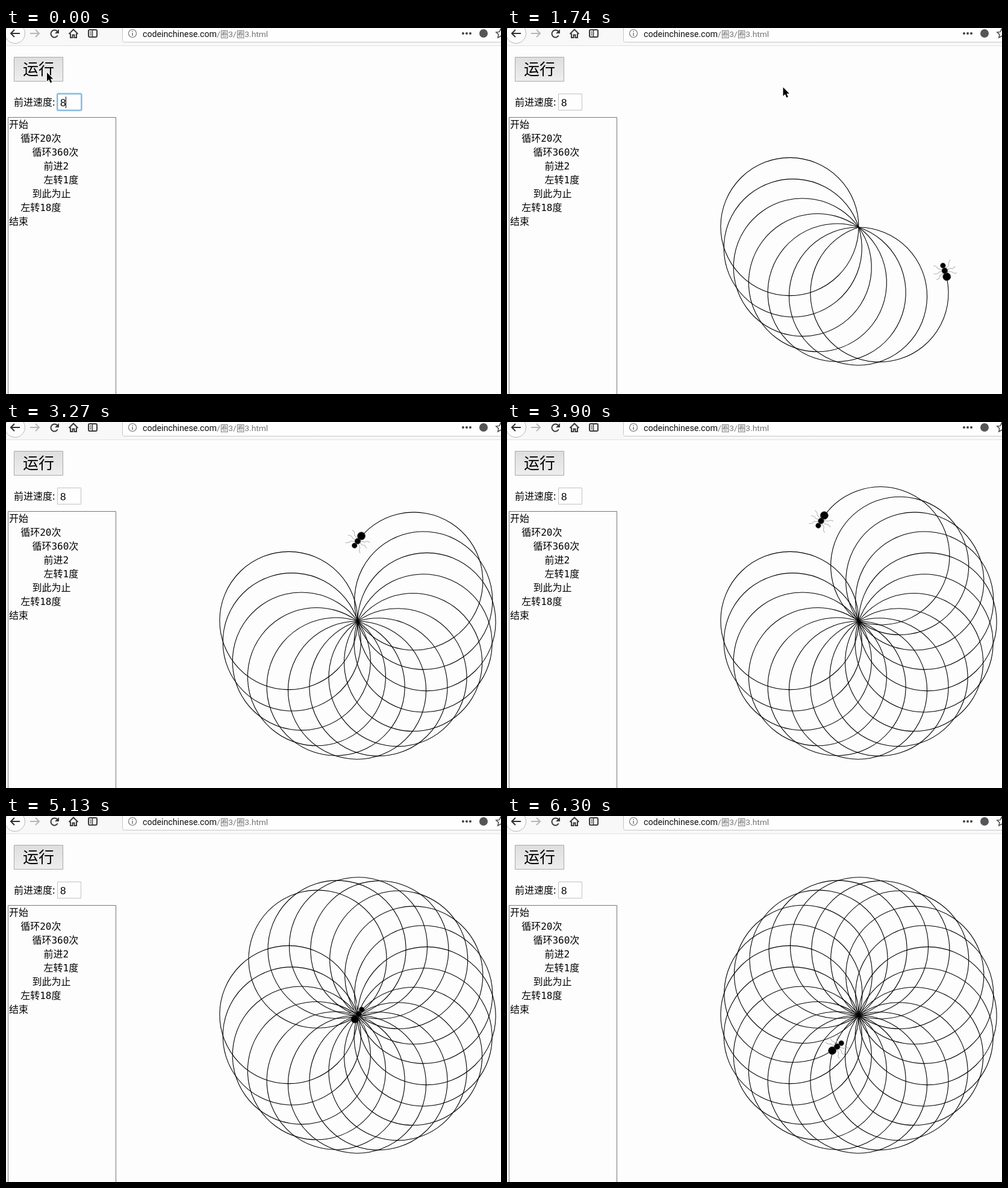
Recreate the animation shown at these times as an HTML page with a canvas. Size 822 px wide and 608 px high, loop 6.33 s.

```html
<!DOCTYPE html>
<html lang="zh">
<head>
<meta charset="utf-8">
<style>
html, body { margin: 0; width: 100%; height: 100%; overflow: hidden; background: #fdfdfd; }
canvas { display: block; }
</style>
</head>
<body>
<canvas id="stage" width="822" height="608"></canvas>
<script>
const g = document.getElementById('stage').getContext('2d');
const LOOP = 6330, STEP = 30, TAU = Math.PI * 2, RAD = Math.PI / 180;
const HOME = { x: 584, y: 331 }, R = 1 / Math.sin(0.5 * RAD);
const CLICK = 690;
const SANS = '"Noto Sans CJK SC", "Noto Sans CJK", sans-serif';
const MONO = '"DejaVu Sans Mono", "Noto Sans CJK SC", "Noto Sans CJK", monospace';

// [time, degrees walked]; [time, x, y] of the pointer tip
const WALK = [[740, 0], [1200, 1344], [2280, 3296], [3270, 4609], [4590, 5984], [5700, 6976], [6300, 7168]];
const POINTER = [[0, 68, 74], [750, 68, 74], [1200, 213, 122], [2280, 704, 75], [2550, 826, 66]];
const PROGRAM = [[0, '开始'], [1, '循环20次'], [2, '循环360次'], [3, '前进2'], [3, '左转1度'],
  [2, '到此为止'], [1, '左转18度'], [0, '结束']];

function along(keys, t, col, map = v => v) {
  let i = 1;
  while (i < keys.length - 1 && t > keys[i][0]) i++;
  const a = keys[i - 1], b = keys[i];
  const u = Math.min(1, Math.max(0, (t - a[0]) / (b[0] - a[0])));
  return map(a[col]) + (map(b[col]) - map(a[col])) * u;
}

// Walking slows down as the trail gets longer.
const LAG = 1900;
function walked(t) {
  const effort = along(WALK, t, 1, d => d * d / 2 + LAG * d);
  return Math.sqrt(LAG * LAG + 2 * effort) - LAG;
}

function path(points, close) {
  g.beginPath();
  points.forEach(([x, y]) => g.lineTo(x, y));
  if (close) g.closePath();
}
function line(points, color, width = 1) {
  path(points);
  g.strokeStyle = color;
  g.lineWidth = width;
  g.stroke();
}
function disc(x, y, r, fill, stroke, width = 1) {
  g.beginPath();
  g.arc(x, y, r, 0, TAU);
  if (fill) { g.fillStyle = fill; g.fill(); }
  if (stroke) { g.strokeStyle = stroke; g.lineWidth = width; g.stroke(); }
}
function box(x, y, w, h, r, fill, stroke, width = 1) {
  g.beginPath();
  g.roundRect(x, y, w, h, r);
  if (fill) { g.fillStyle = fill; g.fill(); }
  g.strokeStyle = stroke;
  g.lineWidth = width;
  g.stroke();
}
function text(s, x, y, font, color = '#000') {
  g.font = font;
  g.fillStyle = color;
  g.fillText(s, x, y);
}

function arrow(x, dir, color) {
  line([[x - 8 * dir, 9], [x + 7 * dir, 9]], color, 2);
  line([[x + 1 * dir, 3], [x + 7 * dir, 9], [x + 1 * dir, 15]], color, 2);
}

function toolbar() {
  const ink = '#3a3a3c';
  g.fillStyle = '#f8f8f9';
  g.fillRect(0, 0, 822, 29);
  line([[0, 29.5], [822, 29.5]], '#e2e2e3');
  disc(15, 9, 16.5, '#fdfdfd', '#b6b6b8');
  arrow(15, -1, '#303032');
  arrow(48, 1, '#b6b6b8');

  g.beginPath();
  g.arc(80.5, 9.5, 6, 0.5, TAU - 0.75);
  g.strokeStyle = ink;
  g.lineWidth = 2;
  g.stroke();
  g.fillStyle = ink;
  path([[88, 2], [88, 9], [81, 9]], true);
  g.fill();

  line([[104.5, 10], [112, 2.5], [119.5, 10]], ink, 2);
  line([[107, 9], [107, 16], [110.5, 16], [110.5, 11.5], [113.5, 11.5], [113.5, 16], [117, 16], [117, 9]], ink, 2);
  box(137, 3, 14, 12, 2, null, ink, 2);
  line([[143.5, 3], [143.5, 15]], ink, 1.5);
  [6.5, 9, 11.5].forEach(y => line([[139, y], [142, y]], ink));

  box(193.5, -8, 660, 31.5, 3, '#fefefe', '#c6c6c8');
  disc(210, 9, 6.5, null, '#737376', 1.2);
  line([[210, 8], [210, 13]], '#737376', 1.5);
  line([[210, 5], [210, 6.5]], '#737376', 1.5);
  const family = 'px Roboto, "Noto Sans CJK SC", "Noto Sans CJK", sans-serif';
  text('codeinchinese.com', 227, 15, 14.2 + family, '#101012');
  text('/圈3/圈3.html', 350, 15, 13.7 + family, '#737376');

  [759, 765, 771].forEach(x => disc(x, 9, 2, '#424244'));
  disc(793, 9, 7, '#555558');
  const star = [];
  for (let i = 0; i < 10; i++) {
    const r = i % 2 ? 3.8 : 8, a = (i * 36 - 90) * RAD;
    star.push([821.5 + r * Math.cos(a), 9.5 + r * Math.sin(a)]);
  }
  path(star, true);
  g.strokeStyle = '#48484a';
  g.lineWidth = 1.5;
  g.stroke();
}

function form(focused) {
  const shade = g.createLinearGradient(0, 48, 0, 89);
  shade.addColorStop(0, '#dededf');
  shade.addColorStop(1, '#eeeeef');
  box(13.5, 48.5, 81, 40, 0, shade, '#a8a8aa');
  text('运行', 28, 77.5, '26px ' + SANS);
  text('前进速度:', 13, 129, '16px ' + SANS);
  if (focused) {
    box(85, 109, 40.5, 28, 2, '#fefefe', '#b2d5ee', 3);
    box(85.5, 109.5, 39.5, 27, 1, null, '#62a6d6');
    line([[99.5, 114], [99.5, 133]], '#000');
  } else {
    box(85.5, 109.5, 39, 27, 0, '#fefefe', '#c2c2c4');
  }
  text('8', 90, 129.5, '17px "Liberation Sans", Arial, sans-serif');

  box(3.5, 148.5, 179, 480, 0, null, '#777779');
  PROGRAM.forEach(([depth, s], i) => text(s, 5 + depth * 19.2, 166 + i * 23, '16px ' + MONO));
}

function ant(x, y, heading) {
  g.save();
  g.translate(x, y);
  g.rotate(-heading);
  [-1, 1].forEach(s => {
    line([[3, 3 * s], [6, 9 * s], [11, 11 * s], [14, 15 * s]], '#b0b0b6');
    line([[0, 3 * s], [1, 10 * s], [-1, 13 * s], [1, 19 * s]], '#b0b0b6');
    line([[-3, 3 * s], [-5, 10 * s], [-9, 13 * s], [-10, 18 * s]], '#b0b0b6');
  });
  disc(-10.5, 0, 6.5, '#000', '#444446', 0.8);
  disc(0, 0, 4.8, '#000', '#444446', 0.6);
  disc(9, 0, 4.3, '#000', '#444446', 0.6);
  g.restore();
}

function drawing(degrees) {
  const last = Math.floor(degrees / 360);
  g.strokeStyle = '#000';
  g.lineWidth = 1.1;
  for (let k = 0; k <= last; k++) {
    // Each ring is a 360-gon, so its tangent lags half a turn step behind the heading.
    const from = (18 * k - 0.5) * RAD;
    const sweep = Math.min(360, degrees - 360 * k) * RAD;
    const x = HOME.x - R * Math.cos(from), y = HOME.y + R * Math.sin(from);
    g.beginPath();
    g.arc(x, y, R, -from, -from - sweep, true);
    g.stroke();
    if (k === last) {
      const a = from + sweep;
      ant(x + R * Math.cos(a), y - R * Math.sin(a), a + Math.PI / 2);
    }
  }
}

function pointer(x, y) {
  g.save();
  g.translate(x, y);
  path([[0, 0], [0, 14.5], [3.3, 11.5], [5.8, 17], [8.3, 16], [5.9, 10.6], [10.3, 10.4]], true);
  g.lineJoin = 'round';
  g.strokeStyle = '#fff';
  g.lineWidth = 2;
  g.stroke();
  g.fillStyle = '#000';
  g.fill();
  g.restore();
}

function frame(now) {
  const t = Math.floor(now % LOOP / STEP) * STEP;
  g.fillStyle = '#fdfdfd';
  g.fillRect(0, 0, 822, 608);
  toolbar();
  form(t < CLICK);
  if (t >= WALK[0][0]) drawing(walked(t));
  if (t < 2550) pointer(along(POINTER, t, 1), along(POINTER, t, 2));
}

let start;
function tick(now) {
  start ??= now;
  frame(now - start);
  requestAnimationFrame(tick);
}
frame(0);
requestAnimationFrame(tick);
</script>
</body>
</html>
```
